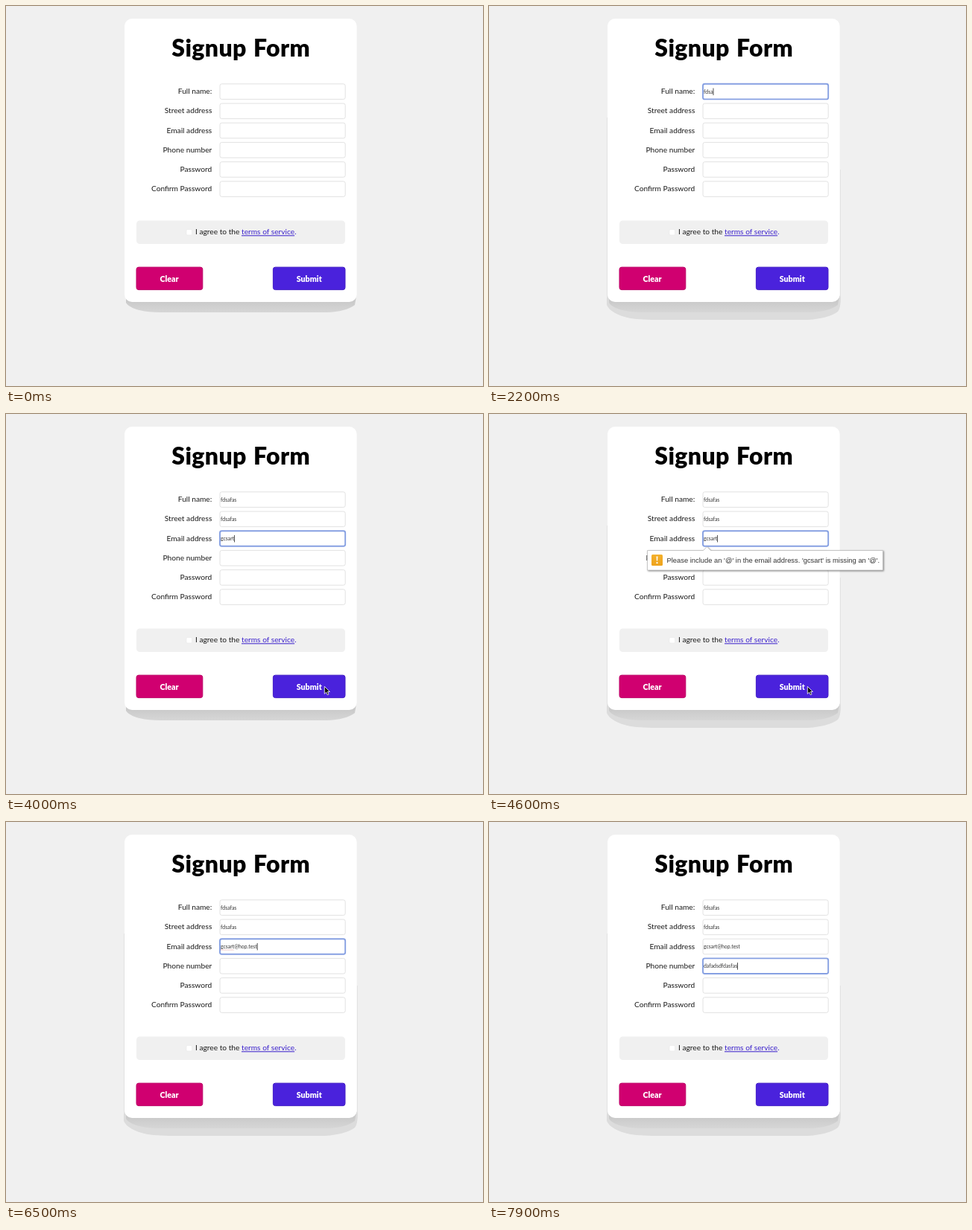
Write an HTML page that moves like this. It is 640x511 px and loops after 8000 ms.

```html
<!DOCTYPE html>
<html lang="en">
<head>
<meta charset="utf-8">
<title>Signup Form</title>
<style>
  html, body { margin: 0; width: 100%; height: 100%; overflow: hidden; background: #f0f0f0; }
  svg { display: block; width: 640px; height: 511px; }
  text { font-family: Lato, "Open Sans", sans-serif; font-size: 10.2px; fill: #1a1a1a; white-space: pre; }
  .title { font-size: 32px; font-weight: 900; letter-spacing: .35px; word-spacing: 1.5px; text-anchor: middle; fill: #000; }
  .label { text-anchor: end; }
  .button { font-size: 10.7px; font-weight: 900; text-anchor: middle; fill: #fff; }
  .value { font-size: 6.9px; fill: #333; }
  .system { font-family: "Liberation Sans", Arial, sans-serif; font-size: 9.4px; fill: #333; }
  .link { fill: #3a20cc; text-decoration: underline; }
  .tip { filter: drop-shadow(1px 1px 1px rgba(0,0,0,.45)); }
  .list { filter: drop-shadow(0 1px 1px rgba(0,0,0,.2)); }
</style>
</head>
<body>
<svg id="stage" viewBox="0 0 640 511">
  <defs>
    <linearGradient id="shade" x1="0" y1="395" x2="0" y2="413" gradientUnits="userSpaceOnUse">
      <stop offset="0" stop-color="#c8c8c8"/><stop offset="1" stop-color="#d7d7d7"/>
    </linearGradient>
    <linearGradient id="amber" x1="0" y1="0" x2="0" y2="1">
      <stop offset="0" stop-color="#f3b02c"/><stop offset="1" stop-color="#eea31c"/>
    </linearGradient>
  </defs>
  <rect width="640" height="511" fill="#f0f0f0"/>
  <g id="wideShade">
    <path d="M158 390V402Q163 414 190 420Q204 422 232 422H428Q456 420 468 411Q472 407 472 390Z" fill="#dcdcdc"/>
    <path d="M158.5 150V392M471.5 220V392" stroke="#e2e2e2"/>
  </g>
  <path d="M161 390V399Q166 407 186 410.5Q198 412 216 412H430Q456 411 468 402L470 390Z" fill="url(#shade)"/>
  <rect x="159" y="17" width="311.6" height="381" rx="10" fill="#fff"/>
  <text class="title" x="315.2" y="68">Signup Form</text>
  <g id="form"></g>
  <rect x="175" y="288.5" width="280" height="31.5" rx="4.5" fill="#f0f0f0"/>
  <rect x="242" y="300.5" width="7.5" height="7.5" rx="1.5" fill="#fff" stroke="#e8e8e8" stroke-width=".6"/>
  <text x="254" y="307.3">I agree to the <tspan class="link">terms of service</tspan><tspan fill="#3a20cc">.</tspan></text>
  <rect x="175" y="351.2" width="88.8" height="30.4" rx="3" fill="#d00070" stroke="#bd0066"/>
  <rect x="358.4" y="351.2" width="96.6" height="30.4" rx="3" fill="#4a22dc" stroke="#421dc6"/>
  <text class="button" x="219" y="370.5">Clear</text>
  <text class="button" x="406.7" y="370.5">Submit</text>
  <g id="list" class="list">
    <rect x="287" y="153" width="168.5" height="33" rx="2" fill="#fff"/>
    <text class="system" x="294.5" y="173">fdsafas</text>
  </g>
  <g id="tips"></g>
  <path id="pointer" d="M0 0V10L2.4 7.9L4 11.4L5.8 10.6L4.2 7.2H7.2Z" fill="#111" stroke="#fff" stroke-width=".8"/>
</svg>
<script>
const LOOP = 8000;
const $ = id => document.getElementById(id);

function add(parent, tag, attrs, text) {
  const el = document.createElementNS('http://www.w3.org/2000/svg', tag);
  for (const key in attrs) el.setAttribute(key, attrs[key]);
  if (text) el.textContent = text;
  parent.appendChild(el);
  return el;
}

const show = (el, on) => el.setAttribute('visibility', on ? 'visible' : 'hidden');
const within = (t, from, to) => t >= from && t < to;

// Each typing run: text, first key time, gap between keys.
// focus: when the field gains and loses focus.
const MAIL = 'gcsart';
const rows = [
  { label: 'Full name:', focus: [1000, 2600], runs: [['fdsafas', 1900, 100]] },
  { label: 'Street address', focus: [2600, 3400], runs: [['fdsafas', 2700, 100]] },
  { label: 'Email address', focus: [3400, 6600],
    runs: [[MAIL, 3450, 90], ['@hop.t', 5200, 100], ['es', 5900, 100], ['t', 6200, 100]] },
  { label: 'Phone number', focus: [6600, LOOP], runs: [['dafadsdfdasfas', 6700, 85]] },
  { label: 'Password', runs: [] },
  { label: 'Confirm Password', runs: [] }
];

rows.forEach((row, i) => {
  const y = 105 + 26.2 * i, form = $('form');
  add(form, 'text', { class: 'label', x: 276.3, y: y + 13.2 }, row.label);
  row.box = add(form, 'rect', { x: 287, y: y - .2, width: 168.2, height: 20.6, rx: 2.5, fill: '#fff' });
  row.value = add(form, 'text', { class: 'value', x: 288, y: y + 12.5 });
  row.caret = add(form, 'rect', { y: y + 5.5, width: .8, height: 9.5, fill: '#222' });
});

const squiggle = add($('form'), 'path', { stroke: '#d77', 'stroke-width': .8, 'stroke-dasharray': '1 1' });

function makeTip(x, y, width, tipX, message) {
  const g = add($('tips'), 'g', {});
  add(g, 'path', {
    class: 'tip', fill: '#fff', stroke: '#b5b5b5', 'stroke-width': .7,
    d: `M${x} ${y}H${tipX - 5}L${tipX} ${y - 5}L${tipX + 5} ${y}H${x + width}V${y + 26.5}H${x}Z`
  });
  add(g, 'rect', { x: x + 5.5, y: y + 5.5, width: 15, height: 15, rx: 1.5, fill: 'url(#amber)' });
  add(g, 'path', { d: `M${x + 12} ${y + 8}h2l-.4 6h-1.2z`, fill: '#fff' });
  add(g, 'circle', { cx: x + 13, cy: y + 16.7, r: 1.1, fill: '#fff' });
  add(g, 'text', { class: 'system', x: x + 26, y: y + 16.7 }, message);
  return g;
}

const emptyTip = makeTip(306.5, 131, 129.5, 318, 'Please fill out this field.');
const mailTip = makeTip(212.5, 183.5, 316, 292.5,
  `Please include an '@' in the email address. '${MAIL}' is missing an '@'.`);

function typed(runs, t) {
  return runs.map(([text, start, gap]) =>
    t < start ? '' : text.slice(0, Math.floor((t - start) / gap) + 1)).join('');
}

function drawRow(row, t) {
  const focused = !!row.focus && within(t, ...row.focus);
  const text = typed(row.runs, t);
  if (row.value.textContent !== text) row.value.textContent = text;
  row.box.setAttribute('stroke', focused ? '#86a0e2' : '#e2e2e2');
  row.box.setAttribute('stroke-width', focused ? 1.9 : 1);
  row.caret.setAttribute('x', 288 + row.value.getComputedTextLength());
  show(row.caret, focused && text);
}

function drawPointer(t) {
  const p = Math.min(1, Math.max(0, (t - 200) / 600));
  const ease = p * p * (3 - 2 * p);
  const x = t < 1900 ? 230 + 198 * ease : 427.3;
  $('pointer').setAttribute('transform', `translate(${x} 366.3)`);
  show($('pointer'), within(t, 200, 1900) || within(t, 3900, 5200));
}

function draw(t) {
  rows.forEach(row => drawRow(row, t));
  const marked = within(t, 5300, 6600);
  if (marked) {
    const width = rows[2].value.getSubStringLength(0, MAIL.length);
    squiggle.setAttribute('d', `M288 172h${width}`);
  }
  show(squiggle, marked);
  show($('wideShade'), within(t, 1000, 2700) || t >= 4500);
  show($('list'), within(t, 2700, 3400));
  show(emptyTip, within(t, 1000, 1900));
  show(mailTip, within(t, 4400, 5200));
  drawPointer(t);
}

function tick() {
  draw(performance.now() % LOOP);
  requestAnimationFrame(tick);
}
tick();
</script>
</body>
</html>
```
